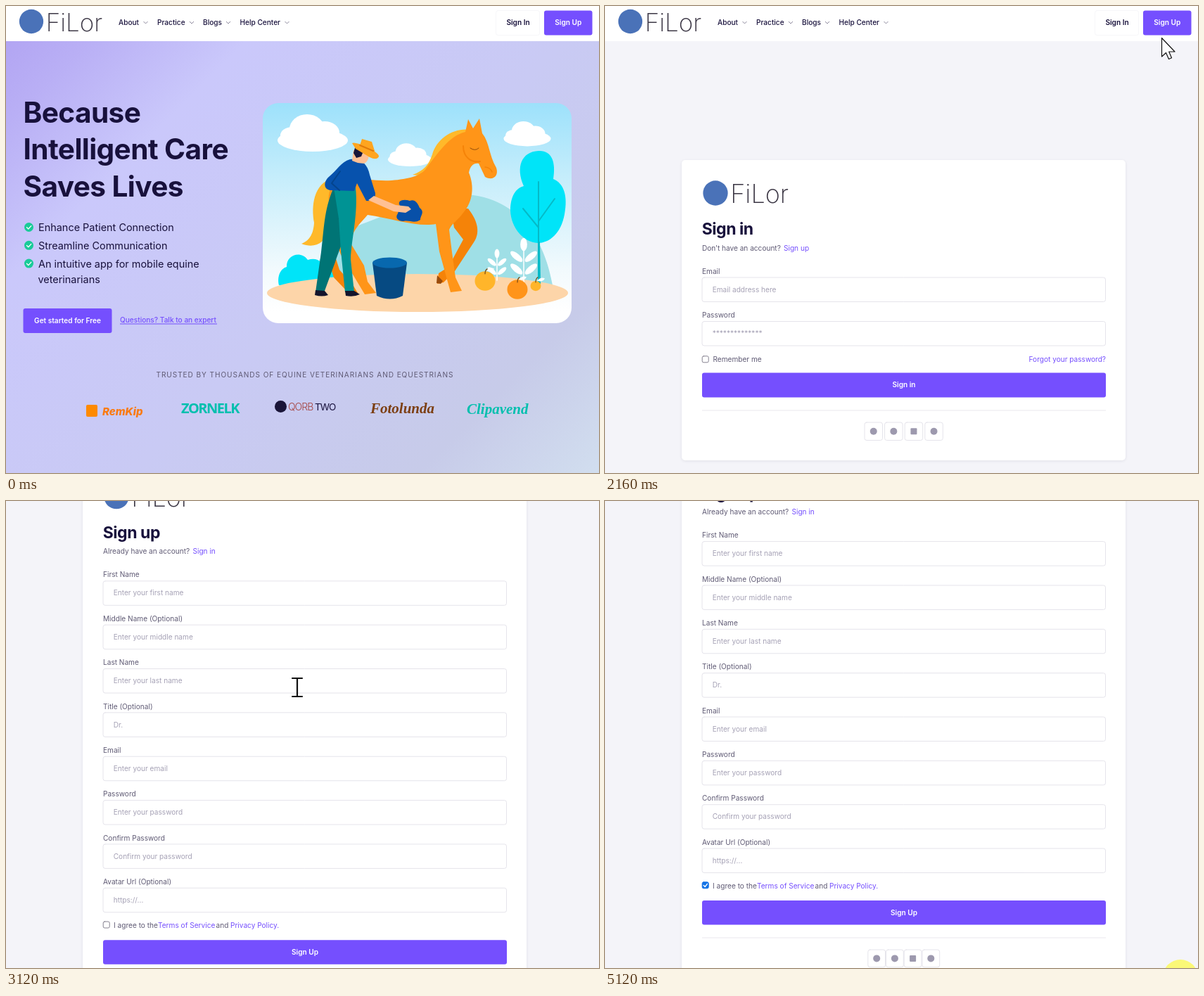
These frames come from a looping animation (843x664 px, 5160 ms). An HTML page with a canvas:

```html
<!DOCTYPE html>
<html lang="en">
<head>
<meta charset="utf-8">
<title>Sign up walkthrough</title>
<style>
html, body { margin: 0; width: 100%; height: 100%; overflow: hidden; background: #fff; }
canvas { display: block; width: 843px; height: 664px; }
</style>
</head>
<body>
<canvas id="stage" width="843" height="664"></canvas>
<script>
const W = 843, H = 664, LOOP = 5160, STEP = 40;
const ctx = document.getElementById('stage').getContext('2d');
const VIOLET = '#754ffe', VIOLET_HOVER = '#6f4bed', INK = '#18113c', GREY = '#5f5a74';
const FAINT = '#a5a1b5', LINE = '#e5e4eb', PAGE = '#f4f4f9';
const SANS = 'Inter, sans-serif', BODY = 10.1;

// ---------- helpers ----------
function text(s, x, midY, o = {}) {
  const { size = BODY, weight = 400, color = GREY, align = 'left', spacing = 0, family = SANS, style = '' } = o;
  ctx.font = `${style} ${weight} ${size}px ${family}`;
  ctx.letterSpacing = spacing + 'px';
  ctx.textAlign = align;
  ctx.fillStyle = color;
  ctx.fillText(s, x, midY + size * 0.364);
  ctx.letterSpacing = '0px';
}
function box(x, y, w, h, r, fill, stroke) {
  ctx.beginPath();
  ctx.roundRect(x, y, w, h, r);
  if (fill) { ctx.fillStyle = fill; ctx.fill(); }
  if (stroke) { ctx.strokeStyle = stroke; ctx.lineWidth = 1; ctx.stroke(); }
}
function oval(x, y, rx, ry, fill, angle = 0) {
  ctx.beginPath();
  ctx.ellipse(x, y, rx, ry, angle, 0, Math.PI * 2);
  ctx.fillStyle = fill;
  ctx.fill();
}
function shape(d, fill, stroke, width = 1) {
  const p = new Path2D(d);
  if (fill) { ctx.fillStyle = fill; ctx.fill(p); }
  if (stroke) {
    ctx.strokeStyle = stroke;
    ctx.lineWidth = width;
    ctx.lineCap = ctx.lineJoin = 'round';
    ctx.stroke(p);
  }
}
function gradient(x0, y0, x1, y1, stops) {
  const g = ctx.createLinearGradient(x0, y0, x1, y1);
  stops.forEach(([at, c]) => g.addColorStop(at, c));
  return g;
}
function button(label, x, y, w, h, hover) {
  box(x, y, w, h, 3, hover ? VIOLET_HOVER : VIOLET);
  text(label, x + w / 2, y + h / 2 - 0.2, { weight: 600, color: '#fff', align: 'center' });
}
function logo(x, y, size) {
  oval(x, y, size * 0.49, size * 0.49, '#4a72b8');
  text('FiLor', x + size * 0.59, y + 1, { size, weight: 200, color: '#3b3644' });
}

// ---------- header ----------
function header(hover) {
  box(0, 0, W, 50, 0, '#fff');
  logo(36, 22, 35);
  [['About', 160, 198.5], ['Practice', 215, 264], ['Blogs', 280, 316], ['Help Center', 332.5, 399.5]].forEach(([s, x, c]) => {
    text(s, x, 23.5, { weight: 500, color: INK });
    shape(`M${c - 2.7} 22.3l2.7 2.7 2.7-2.7`, null, '#8b879b', 1);
  });
  box(696.5, 6.5, 62, 35, 3, '#fff', '#f6f6f9');
  text('Sign In', 728, 23.5, { weight: 600, color: INK, align: 'center' });
  button('Sign Up', 765, 6.5, 68.5, 35, hover);
}

// ---------- landing page ----------
function cloud(x, y, s) {
  ctx.save();
  ctx.translate(x, y);
  ctx.scale(s, s);
  oval(0, 10, 50, 16, '#fff');
  oval(-8, -6, 25, 21, '#fff');
  oval(17, -1, 21, 16, '#fff');
  oval(-29, 3, 17, 12, '#fff');
  ctx.restore();
}
function plant(x, y, h) {
  shape(`M${x} ${y}V${y - h}`, null, '#fff', 1.5);
  oval(x, y - h, h * 0.09, h * 0.17, '#fff');
  [0.35, 0.68].forEach(k => [-1, 1].forEach(side =>
    oval(x + side * h * 0.19, y - h * k, h * 0.2, h * 0.08, '#fff', side * -0.7)));
}
function fruit(x, y, r, color) {
  oval(x, y, r, r * 0.95, color);
  shape(`M${x} ${y - r * 0.7}q0-5 3-7`, null, '#7c4b12', 1.3);
  shape(`M${x + 2} ${y - r}q6-6 11-3q-4 6-11 3`, '#fff');
}
function horse() {
  const orange = '#ff9518', shade = '#f58308', yellow = '#ffb92a';
  shape('M466 244C436 252 434 286 438 308C437 326 430 334 420 338C438 345 454 338 458 318C464 296 460 278 472 262Z', yellow);
  shape('M660 176C638 172 612 188 606 211C601 226 594 234 578 240L634 246Z', yellow);
  shape('M472 300L463 340L474 375L494 398L500 408L486 407L466 386L452 342L458 290Z', shade);
  shape('M632 288L657 288C668 302 676 320 665 336L638 377L622 393L613 395L615 380L629 371L650 332L637 315Z', shade);
  shape('M466 252C484 238 514 250 548 248C572 246 590 242 598 230C612 212 630 184 653 179L657 161L664 174L673 160L677 181C688 195 686 211 697 230C701 242 692 249 681 243L672 224C665 223 660 227 658 237C666 256 664 278 650 294C643 304 634 309 630 318L634 350L639 386L648 405L632 407L627 389L616 349L611 310C586 315 548 302 514 297C504 309 490 320 491 339L509 369L514 392L526 408L510 410L501 395L480 360C466 340 472 318 468 296C456 284 456 264 466 252Z', orange);
  shape('M650 199C650 216 662 223 674 221', null, shade, 2);
  shape('M660 202q7 5 12 0', null, '#8e4a0a', 1);
  shape('M681 229q8 1 10 7', null, shade, 1.5);
  shape('M613 383l8 8-3 4-6-1Z', '#9a4b0c');
}
function groom() {
  const blue = '#0752ad', skin = '#ffc094';
  shape('M465 260L496 262C494 302 476 340 468 364L453 405L440 407L448 350C452 318 452 290 465 260Z', '#007475');
  shape('M466 258L497 258C501 296 491 330 490 360L495 407L482 407L476 348L473 302Z', '#009394');
  shape('M440 404l13 1 5 6q-9 3-19 0ZM482 405h13l8 5q-8 4-20 2Z', '#15142b');
  shape('M489 218C504 216 514 224 517 240L525 266C526 274 519 278 512 277L499 252L495 263L461 262C450 260 452 248 460 242C470 234 476 222 489 218Z', blue);
  shape('M475 235L463 252L474 262', null, '#04448e', 2);
  shape('M494 205h12l10 5q0 11-7 14l-9-1-8-3Z', skin);
  shape('M497 198l12 6-4 10-7 2-4-7Z', '#17163a');
  shape('M503 198L506 189L520 193L525 209ZM492 195Q496 193 514 201Q531 210 530 214Q527 220 517 215L497 203Z', '#ffa51f');
  shape('M503 198L522 206', null, '#e17a0a', 2);
  shape('M515 276l8-6 31 13 18 2 4 4-8 5-17-2Z', skin);
}
function illustration() {
  ctx.save();
  box(365, 138, 439, 313, 22, gradient(0, 138, 0, 435, [[0, '#9de1fb'], [0.35, '#c5edfb'], [0.8, '#f2fafd'], [1, '#fff']]));
  ctx.clip();
  cloud(436, 181, 1);
  cloud(574, 212, 0.62);
  cloud(741, 182, 0.67);
  shape('M437 397C440 356 461 328 506 310C546 296 590 272 638 268C702 265 760 302 777 397Z', '#9fdfe6');
  shape('M388 397C385 383 391 373 399 371C398 354 419 347 429 361C443 357 450 364 450 374C468 370 479 383 477 397Z', '#00e4f8');
  oval(585, 408, 214, 27, '#fdd5a9');
  shape('M757 206C776 205 782 222 778 246C793 252 799 270 794 296C789 324 772 337 756 337C736 336 718 316 717 291C717 270 725 259 736 256C724 229 733 207 757 206Z', '#00e4f8');
  shape('M757 250V394M757 315L735 288M757 306L780 274', null, '#05bac7', 2);
  shape('M756 335h3l1 60h-4Z', '#05bac7');
  plant(698, 390, 38);
  plant(736, 393, 54);
  horse();
  shape('M560 284C555 276 566 274 574 277C582 274 586 282 588 287C596 293 589 298 589 304C580 310 574 304 565 306C556 306 553 300 557 295Z', '#0850a8');
  groom();
  shape('M521 365L527 412Q546 421 564 412L570 365Z', '#064a82');
  oval(545.5, 365, 24.5, 7.5, '#0868ae');
  fruit(681, 391, 14.5, '#ffb52a');
  fruit(727, 403, 14.5, '#ff941a');
  fruit(753, 398, 7.5, '#ffb52a');
  ctx.restore();
}
function landing() {
  box(0, 0, W, H, 0, gradient(45, -30, 798, 723, [
    [0, '#b0a2f2'], [0.1, '#b9aff5'], [0.25, '#cac8fb'], [0.55, '#c9caf4'], [0.82, '#c7cbe9'], [1, '#d2dfef']]));
  header();
  ['Because', 'Intelligent Care', 'Saves Lives'].forEach((s, i) =>
    text(s, 24.5, 151 + i * 52.4, { size: 40.6, weight: 700, color: INK, spacing: -0.6 }));
  ['Enhance Patient Connection', 'Streamline Communication', 'An intuitive app for mobile equine'].forEach((s, i) => {
    const y = 315 + i * 25.8;
    oval(32.5, y - 0.5, 6.5, 6.5, '#19cb98');
    shape(`M29.5 ${y - 0.3}l2.3 2.3 4-4.4`, null, '#fff', 1.3);
    text(s, 46, y, { size: 14.45, color: INK });
  });
  text('veterinarians', 45.5, 389, { size: 14.45, color: INK });
  button('Get started for Free', 24.5, 430, 126, 35);
  text('Questions? Talk to an expert', 162, 446.5, { weight: 500, color: VIOLET });
  box(162, 451.5, 138, 1, 0, VIOLET);
  text('TRUSTED BY THOUSANDS OF EQUINE VETERINARIANS AND EQUESTRIANS', 213.5, 524, { spacing: 0.92 });
  illustration();
  box(114, 567, 16, 17, 2, '#ff8a00');
  text('RemKip', 137, 577, { size: 15, weight: 800, style: 'italic', color: '#fa7a10' });
  text('ZORNELK', 249, 572, { size: 20, weight: 700, color: '#00bfae', family: '"Open Sans", sans-serif', spacing: -1.5 });
  oval(390.5, 569.5, 8.5, 8.5, '#1a1538');
  text('QORB', 401, 570, { size: 14, weight: 300, color: '#a5433f', spacing: -1 });
  text('TWO', 439, 570, { size: 13.5, color: INK, spacing: -1 });
  const script = { size: 21, weight: 700, style: 'italic', family: '"Liberation Serif", serif' };
  text('Fotolunda', 518, 571, { ...script, color: '#7c3f12' });
  text('Clipavend', 655, 572, { ...script, color: '#00bfae' });
}

// ---------- forms ----------
function card(y, h) {
  ctx.save();
  ctx.shadowColor = 'rgba(24,17,60,.09)';
  ctx.shadowBlur = 4;
  ctx.shadowOffsetY = 1;
  box(109, y, 631, h, 5, '#fff');
  ctx.restore();
}
function field(label, hint, y) {
  text(label, 138, y - 9);
  box(138, y, 573.5, 34.5, 3, '#fff', LINE);
  text(hint, 152.7, y + 17, { color: FAINT });
}
function checkbox(y, on) {
  box(138.2, y - 4.7, 9, 9, 2, on ? '#1473e6' : '#fff', on ? '#1473e6' : '#85818f');
  if (on) shape(`M140.2 ${y}l2 2 3.2-4.2`, null, '#fff', 1.4);
}
function formHead(title, prompt, link, linkX, y) {
  logo(157, y, 36);
  text(title, 137.7, y + 51, { size: 23.04, weight: 700, color: INK, spacing: -0.46 });
  text(prompt, 138, y + 78);
  text(link, linkX, y + 78, { color: VIOLET });
}
function socials(x, y, size, step) {
  box(138, y - 17.5, 574, 1, 0, '#e9e8ee');
  for (let i = 0; i < 4; i++) {
    const left = x + i * step, c = size / 2;
    box(left, y, size, size, 3, '#fff', LINE);
    if (i === 2) box(left + c - 4.5, y + c - 4.5, 9, 9, 1, '#9d99ae');
    else oval(left + c, y + c, 5, 5, '#9d99ae');
  }
}
function signIn(hover) {
  box(0, 0, W, H, 0, PAGE);
  header(hover);
  card(219, 427);
  formHead('Sign in', 'Don’t have an account?', 'Sign up', 254, 266);
  field('Email', 'Email address here', 386);
  field('Password', '*'.repeat(14), 448.5);
  checkbox(502.5, false);
  text('Remember me', 153.5, 502.5);
  text('Forgot your password?', 712, 502.5, { color: VIOLET, align: 'right' });
  button('Sign in', 138, 521.5, 574, 35);
  socials(369, 592, 25.5, 28.6);
}
const FIELDS = [
  ['First Name', 'Enter your first name'], ['Middle Name (Optional)', 'Enter your middle name'],
  ['Last Name', 'Enter your last name'], ['Title (Optional)', 'Dr.'],
  ['Email', 'Enter your email'], ['Password', 'Enter your password'],
  ['Confirm Password', 'Confirm your password'], ['Avatar Url (Optional)', 'https://...']];
const fieldY = i => 216.6 + i * 62.35;
function signUp(scroll, checked, topHover, hover) {
  box(0, 0, W, H, 0, PAGE);
  ctx.save();
  ctx.translate(0, -scroll);
  card(50, 810);
  header(topHover);
  formHead('Sign up', 'Already have an account?', 'Sign in', 265.5, 96.5);
  FIELDS.forEach(([label, hint], i) => field(label, hint, fieldY(i)));
  checkbox(705.5, checked);
  text('I agree to the', 153, 706.5);
  text('Terms of Service', 216, 706.5, { color: VIOLET });
  text('and', 298.5, 706.5);
  text('Privacy Policy.', 319, 706.5, { color: VIOLET });
  button('Sign Up', 138, 727, 574, 34.5, hover);
  socials(373.8, 797, 24.8, 25.7);
  ctx.restore();
}

// ---------- pointer ----------
const PATH = [
  [200, 850, 255], [480, 772, 105], [720, 738, 31], [1200, 738, 31], [1440, 530, 245],
  [1600, 369, 426], [1760, 361, 398], [2160, 791, 45], [2320, 800, 30], [2460, 800, 30],
  [2880, 414, 265], [3240, 414, 265], [3440, 330, 580], [3520, 282, 627], [3640, 238, 619],
  [3880, 140, 553], [3960, 142, 546], [4080, 142, 546], [4280, 288, 580], [4560, 735, 662],
  [4680, 818, 677], [5160, 818, 677]];
const CLICKS = [[880, 960], [2360, 2440], [4040, 4120], [5120, 5160]];

function slope(i, k) {
  const a = PATH[i - 1], b = PATH[i], c = PATH[i + 1];
  if (!a || !c || a[k] === b[k] || b[k] === c[k]) return 0;
  return (c[k] - a[k]) / (c[0] - a[0]);
}
function pointerAt(t) {
  if (t <= PATH[0][0]) return PATH[0].slice(1);
  const i = PATH.findIndex((p, n) => n + 1 === PATH.length - 1 || t < PATH[n + 1][0]);
  const a = PATH[i], b = PATH[i + 1], d = b[0] - a[0], u = (t - a[0]) / d;
  return [1, 2].map(k => {
    const h = u * u * (3 - 2 * u);
    return a[k] + (b[k] - a[k]) * h
      + d * (slope(i, k) * u * (1 - u) ** 2 - slope(i + 1, k) * u * u * (1 - u));
  });
}
function drawPointer(kind, x, y) {
  ctx.save();
  ctx.translate(x, y);
  if (kind === 'beam') {
    shape('M-7-13H7M-7 13H7M0-13V13', null, '#111', 2.2);
  } else if (kind === 'hand') {
    shape('M-2.5 21V2a2.5 2.5 0 0 1 5 0V12.5C4 10 7.5 11 7.5 13.5C9 11.5 12 12.5 12 15C14 13.5 16 15 16 17V25C16 32 11 36 4 36C-1 36-4 33-6 29L-10 22.5C-11 20-8 18.5-6 20.5Z', '#fff', '#111', 1.4);
    shape('M2.5 12v6M7.5 13.5v5M12 15v4', null, '#111', 1.3);
  } else {
    shape('M.5.5V27L6.5 21.5 10.5 30.5 14.5 28.8 10.7 20H19Z', '#fff', '#111', 1.2);
  }
  ctx.restore();
}

// ---------- timeline ----------
function draw(t) {
  const [x, y] = pointerAt(t);
  const page = t < 1040 ? 'landing' : t < 2480 ? 'signIn' : 'signUp';
  const k = Math.min(1, Math.max(0, (t - 2900) / 370));
  const scroll = 159 * (1 - Math.cos(Math.PI * k)) / 2;
  const docY = y + scroll;
  const inside = (l, top, r, bottom) => x >= l && x <= r && docY >= top && docY <= bottom;
  const onField = top => inside(138, top - 4, 712, top + 35);
  const overTop = inside(765, 6, 833, 41);
  const overSubmit = page === 'signUp' && inside(138, 727, 712, 761.5);
  const tops = page === 'signIn' ? [386, 448.5] : page === 'signUp' ? FIELDS.map((f, i) => fieldY(i)) : [];

  if (page === 'landing') landing();
  else if (page === 'signIn') signIn(overTop);
  else signUp(scroll, t >= 4120, overTop, overSubmit);

  if (CLICKS.some(([from, to]) => t >= from && t < to)) oval(x, y, 25, 25, 'rgba(253,250,70,.72)');
  const kind = overTop || overSubmit || inside(697, 6, 758, 41) ? 'hand' : tops.some(onField) ? 'beam' : 'arrow';
  drawPointer(kind, x, y);
}
function tick(now) {
  draw(Math.floor((now % LOOP) / STEP) * STEP);
  requestAnimationFrame(tick);
}
draw(0);
requestAnimationFrame(tick);
</script>
</body>
</html>
```
